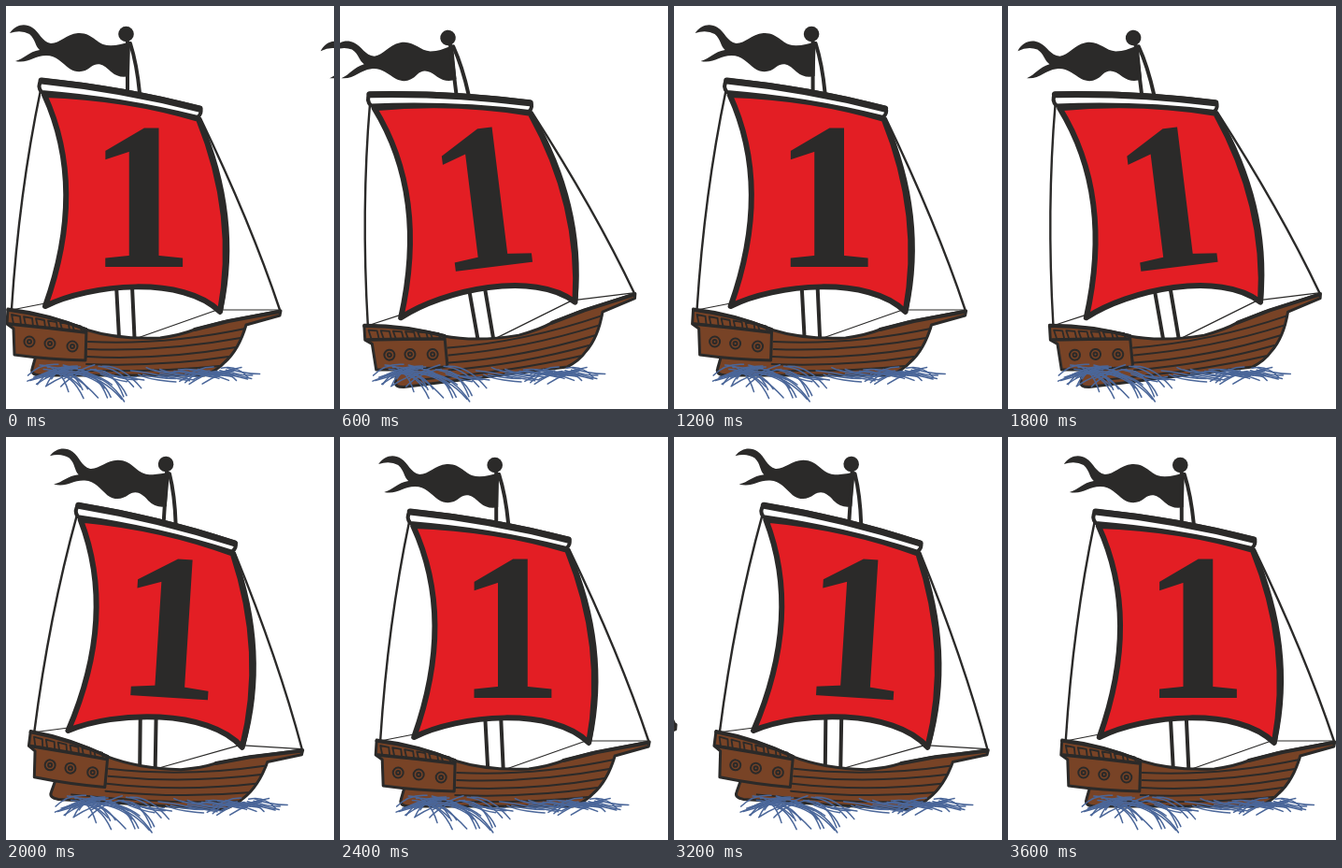
Recreate the animation shown at these times as an HTML page. Size 351 by 431 pixels, loop 3800 ms.

```html
<!DOCTYPE html>
<html lang="en">
<head>
<meta charset="utf-8">
<title>Rocking ship</title>
<style>
  html, body { margin: 0; width: 100%; height: 100%; overflow: hidden; background: #fff; }
  svg { display: block; width: 100vw; height: 100vh; }
  .ink { fill: #2b2a29; }
  .line { fill: none; stroke: #2b2a29; stroke-linecap: round; stroke-linejoin: round; }
  .wood { fill: #784326; stroke: #2b2a29; stroke-width: 3; stroke-linejoin: round; }
  .sea { fill: none; stroke: #4a6699; stroke-width: 1.5; stroke-linecap: round; }
  .numeral { font: bold 225px "Liberation Serif", serif; text-anchor: middle; }
</style>
</head>
<body>
<svg viewBox="0 0 351 431">
  <defs>
    <g id="ship">
      <!-- flag and mast -->
      <path class="ink" d="M4 29C10 20 20 18 28 23C36 28 38 38 48 40C58 40 64 30 77 29C92 28 96 40 108 42Q120 43 133 38L132 75Q121 78 112 70C104 62 98 60 91 65C84 71 76 72 68 67C60 61 54 53 43 53C30 53 24 62 10 59C20 56 24 49 36 47C31 43 32 36 25 30Q16 25 4 29Z"/>
      <circle class="ink" cx="128.500" cy="30" r="8.300"/>
      <path class="line" stroke-width="4" d="M130 38V91M133 40Q140 62 143 93M118 298L121 355M135 300L137.500 355"/>
      <!-- rigging -->
      <path class="line" stroke-width="2.400" d="M37 90Q14 200 6 324M208 120Q262 232 293 325"/>
      <path class="line" stroke-width="1.200" d="M6 325L42 318M138 356L226 325H292"/>
      <!-- sail -->
      <path fill="#e31e24" class="sail" d="M41 95Q87 195 42 321C90 297 190 288 229 327Q248 225 206 121Q130 98 41 95Z" stroke="#2b2a29" stroke-width="6" stroke-linejoin="round"/>
      <path class="line" stroke-width="3" d="M208 122Q252 225 231 324"/>
      <text class="ink numeral" x="144.500" y="279">1</text>
      <!-- yard -->
      <path d="M38 79Q125 87 208 109Q210 115 205 119Q125 99 38 92Q33 86 38 79Z" fill="#fff" stroke="#2b2a29" stroke-width="4" stroke-linejoin="round"/>
      <path class="line" stroke-width="7" d="M38 80Q125 89 207 110"/>
      <!-- hull -->
      <path class="wood" d="M85 346Q120 357 165 355Q187 352 202 346L232 338L294 326L293 331L257 341Q249 368 234 381Q226 390 212 395H36Q26 394 28 388L32 374L85 376Z"/>
      <path class="line" stroke-width="4" d="M202 346L238 337L292 327"/>
      <path class="line" stroke-width="2" d="M88 359Q170 363 256 345M88 367Q170 370 251 355M87 375Q165 379 246 365M86 383Q165 386 238 375M50 389Q150 393 228 385"/>
      <path class="wood" d="M2 324Q45 329 86 346L85 379Q45 378 9 373L8 345L1 340Z"/>
      <path class="line" stroke-width="3.500" d="M2 325Q48 331 86 346M3 340Q45 344 85 349"/>
      <g id="panes" class="line" stroke-width="1.800"></g>
      <g id="ports" class="line" stroke-width="2"></g>
    </g>
    <g id="water" class="sea"></g>
  </defs>
  <g id="stage"></g>
</svg>
<script>
const NS = "http://www.w3.org/2000/svg";
const STEP = 200, COUNT = 19, WIDTH = 351, DRIFT = 3.1;
// angle, dx, dy for each step of the rocking cycle
const POSES = [[0, 0, 0], [-7, 0, 0], [-12, 1, 1], [-7, 0, 0], [3.6, 0, 0], [11, -2, 2]];

function add(parent, tag, attrs) {
  const node = document.createElementNS(NS, tag);
  for (const key in attrs) node.setAttribute(key, attrs[key]);
  return parent.appendChild(node);
}
const byId = id => document.getElementById(id);

for (let i = 0; i < 6; i++) {
  const x = 6 + i * 13, y = 330 + i * 2.1;
  add(byId("panes"), "path", { d: `M${x} ${y}l9 1.800l1 ${9 - i * .6}l-8 -1Z` });
}
for (const [x, y] of [[25, 359], [47, 361], [71, 364]]) {
  add(byId("ports"), "circle", { cx: x, cy: y, r: 5.5 });
  add(byId("ports"), "circle", { cx: x, cy: y, r: 2 });
}

let seed = 11;
function rand(low, high) {
  seed = (seed * 16807) % 2147483647;
  return low + (high - low) * seed / 2147483647;
}
function strand(x, y, bendX, bendY, endX, endY) {
  const p = [bendX, bendY, endX, endY].map(v => v.toFixed(1));
  add(byId("water"), "path", { d: `M${x.toFixed(1)} ${y.toFixed(1)}q${p}` });
}
for (let i = 0; i < 17; i++) {
  const x = 36 + i * 4.2;
  strand(x, rand(384, 395), rand(16, 30), rand(-3, 6), rand(30, 50), rand(14, 31));
}
for (let i = 0; i < 14; i++) {
  strand(rand(55, 98), rand(383, 391), rand(-26, -14), rand(-4, 4), rand(-42, -30), rand(8, 20));
}
for (let i = 0; i < 12; i++) {
  strand(rand(100, 165), rand(385, 396), rand(12, 20), rand(1, 10), rand(28, 42), rand(3, 9));
}
for (let i = 0; i < 16; i++) {
  strand(rand(180, 240), rand(386, 395), rand(10, 18), rand(-4, 8), rand(25, 37), rand(2, 10));
}
for (let i = 0; i < 8; i++) {
  strand(rand(215, 258), rand(386, 392), rand(-18, -8), rand(0, 3), rand(-34, -22), rand(5, 14));
}

// Cells lie side by side on a strip, so a ship can spill into its neighbours.
const cells = [-1, 0, 1].map(offset => {
  const group = add(byId("stage"), "g", {});
  return {
    offset, group,
    ship: add(group, "use", { href: "#ship" }),
    water: add(group, "use", { href: "#water" })
  };
});

function show(step) {
  for (const { offset, group, ship, water } of cells) {
    const index = step + offset;
    const inside = index >= 0 && index < COUNT;
    group.setAttribute("display", inside ? "inline" : "none");
    if (!inside) continue;
    const [angle, dx, dy] = POSES[index % POSES.length];
    const x = index * DRIFT + offset * WIDTH;
    ship.setAttribute("transform", `translate(${x + dx} ${dy}) rotate(${angle} 150 214)`);
    water.setAttribute("transform", `translate(${x - angle * .4} 0)`);
  }
}

let shown = -1;
const start = performance.now();
function tick() {
  const step = Math.floor((performance.now() - start) / STEP) % COUNT;
  if (step !== shown) show(shown = step);
  requestAnimationFrame(tick);
}
tick();
</script>
</body>
</html>
```
